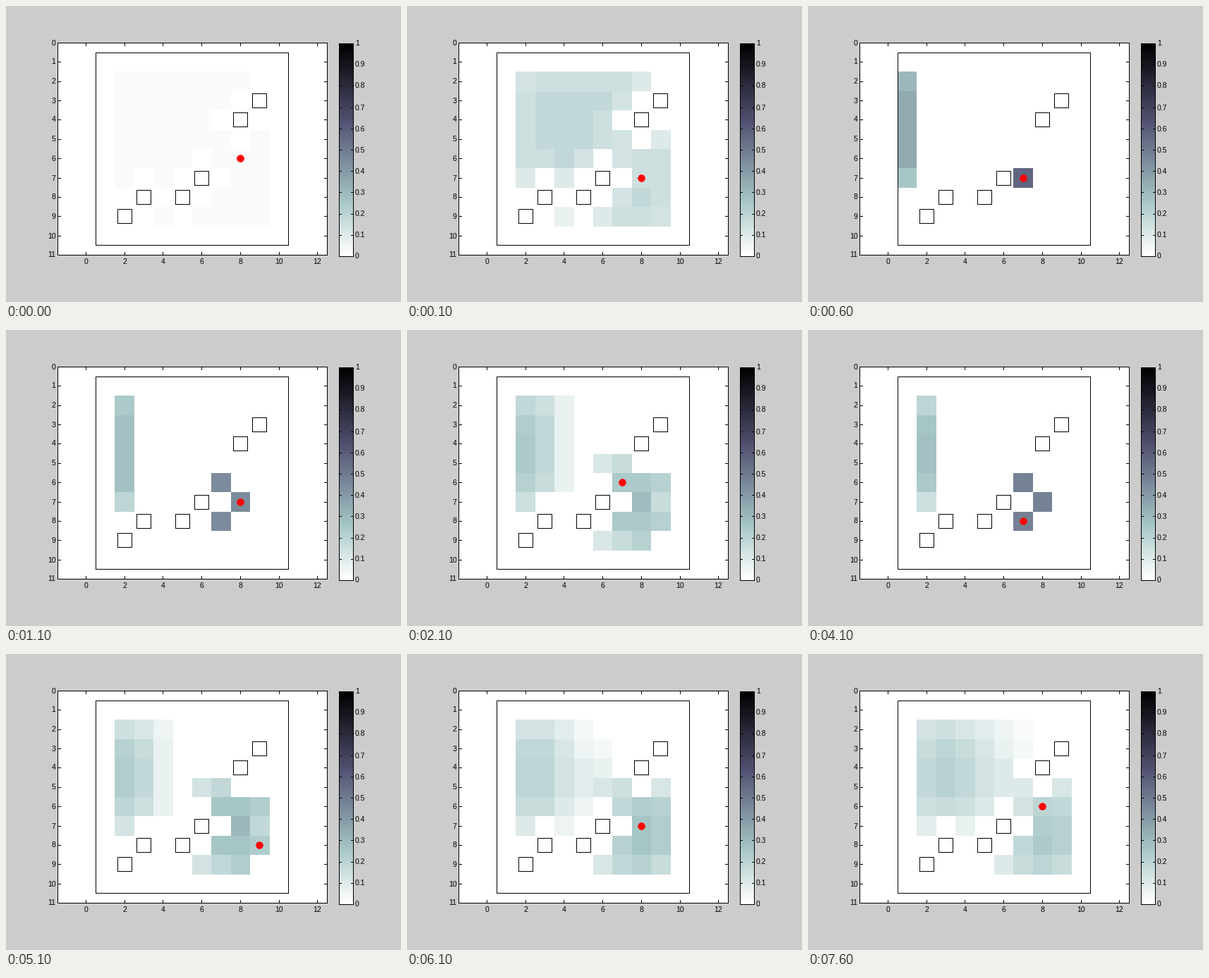
A matplotlib script for the animation above (8 s loop, 560 by 420 pixels).

```python
import numpy as np
import matplotlib.pyplot as plt
from matplotlib.animation import FuncAnimation
from matplotlib.colors import ListedColormap
from matplotlib.patches import Circle, Rectangle

W, H, DPI = 560, 420, 100
N = 10
STEP_FRAMES = 5

OBSTACLES = [(9, 3), (8, 4), (6, 7), (3, 8), (5, 8), (2, 9)]
PATH = [(8, 6), (8, 7), (7, 7), (8, 7), (8, 6), (7, 6), (8, 6), (7, 6), (7, 7),
        (7, 8), (8, 8), (9, 8), (8, 8), (8, 7), (9, 7), (8, 7), (8, 6)]


def px(x):
    return int(np.floor(264 + 301 / 11 * (x - 5.5)))


def py(y):
    return int(np.floor(52.5 + 301 / 11 * y))


def bone_reversed(n=64):
    ramp = np.arange(1, n + 1)
    third = 3 * n // 8
    red = np.clip(ramp / third, 0, 1)
    green = np.clip((ramp - third) / third, 0, 1)
    blue = np.clip((ramp - 2 * third) / (n - 2 * third), 0, 1)
    gray = np.linspace(0, 1, n)
    bone = (7 * gray[:, None] + np.column_stack([blue, green, red])) / 8
    return ListedColormap(bone[::-1])


def neighbours(grid):
    """Values above, below, left and right of each inner cell."""
    return grid[:-2, 1:-1], grid[2:, 1:-1], grid[1:-1, :-2], grid[1:-1, 2:]


def track_beliefs():
    """Bayes filter: spread to the four neighbours, then keep matching cells."""
    wall = np.ones((N + 2, N + 2), int)
    wall[1:-1, 1:-1] = 0
    for x, y in OBSTACLES:
        wall[y, x] = 1
    code = sum(side << k for k, side in enumerate(neighbours(wall)))
    free = wall[1:-1, 1:-1] == 0

    shown = []
    belief = np.ones((N, N))
    for k, (x, y) in enumerate(PATH):
        if k:
            belief = belief + sum(neighbours(np.pad(belief, 1)))
        belief = belief * (free & (code == code[y - 1, x - 1]))
        belief = belief / belief.sum()
        shown.append(np.sqrt(belief) if k else belief)
    return shown


fig = plt.figure(figsize=(W / DPI, H / DPI), dpi=DPI, facecolor="#cccccc")
ax = fig.add_axes([0, 0, 1, 1])
ax.set_xlim(0, W)
ax.set_ylim(H, 0)
ax.axis("off")


def fill(x, y, w, h, color="black", z=3):
    ax.add_patch(Rectangle((x, y), w, h, facecolor=color, linewidth=0, zorder=z))


def outline(left, top, right, bottom):
    fill(left, top, right - left + 1, 1)
    fill(left, bottom, right - left + 1, 1)
    fill(left, top, 1, bottom - top + 1)
    fill(right, top, 1, bottom - top + 1)


def label(x, y, text, ha):
    ax.text(x, y, text, ha=ha, va="center", color="black",
            family="Liberation Sans", size=10.5 * 72 / DPI)


cmap = bone_reversed()
beliefs = track_beliefs()

# Main plot
LEFT, TOP, RIGHT, BOTTOM = 73, 52, 455, 353
TICK = 4
fill(LEFT, TOP, RIGHT - LEFT + 1, BOTTOM - TOP + 1, "white", z=0)
outline(LEFT, TOP, RIGHT, BOTTOM)
for v in range(0, 13, 2):
    fill(px(v), TOP, 1, TICK + 1)
    fill(px(v), BOTTOM - TICK, 1, TICK + 1)
    label(px(v) + 0.5, 362.5, str(v), "center")
for v in range(12):
    fill(LEFT, py(v), TICK + 1, 1)
    fill(RIGHT - TICK, py(v), TICK + 1, 1)
    label(70.5, py(v) + 0.5, str(v), "right")

edges = 27.4 * np.arange(N + 1)
mesh = ax.pcolormesh(np.round(127 + edges), np.round(66 + edges), beliefs[0],
                     cmap=cmap, vmin=0, vmax=1, zorder=1)
outline(px(0.5), py(0.5), px(10.5), py(10.5))
for cx, cy in OBSTACLES:
    outline(px(cx) - 10, py(cy) - 10, px(cx) + 10, py(cy) + 10)

# Colour bar
BAR_L, BAR_T, BAR_R, BAR_B = 472, 53, 492, 355
ax.pcolormesh([BAR_L, BAR_R], np.linspace(BAR_B, BAR_T, 65),
              (np.arange(64)[:, None] + 0.5) / 64, cmap=cmap, vmin=0, vmax=1, zorder=1)
outline(BAR_L, BAR_T, BAR_R, BAR_B)
for k in range(11):
    y = round(BAR_B - (BAR_B - BAR_T) * k / 10)
    fill(BAR_L, y, 4, 1)
    fill(BAR_R - 3, y, 4, 1)
    label(495, y + 0.5, f"{k / 10:g}", "left")

robot = Circle((0, 0), 4.7, facecolor="red", linewidth=0, antialiased=False, zorder=4)
ax.add_patch(robot)


def update(i):
    step = (i + STEP_FRAMES - 1) // STEP_FRAMES
    x, y = PATH[step]
    mesh.set_array(beliefs[step])
    robot.center = px(x) + 0.5, py(y) + 0.5
    return mesh, robot


anim = FuncAnimation(fig, update, frames=80, interval=100, repeat=True, repeat_delay=0)
plt.show()
```
